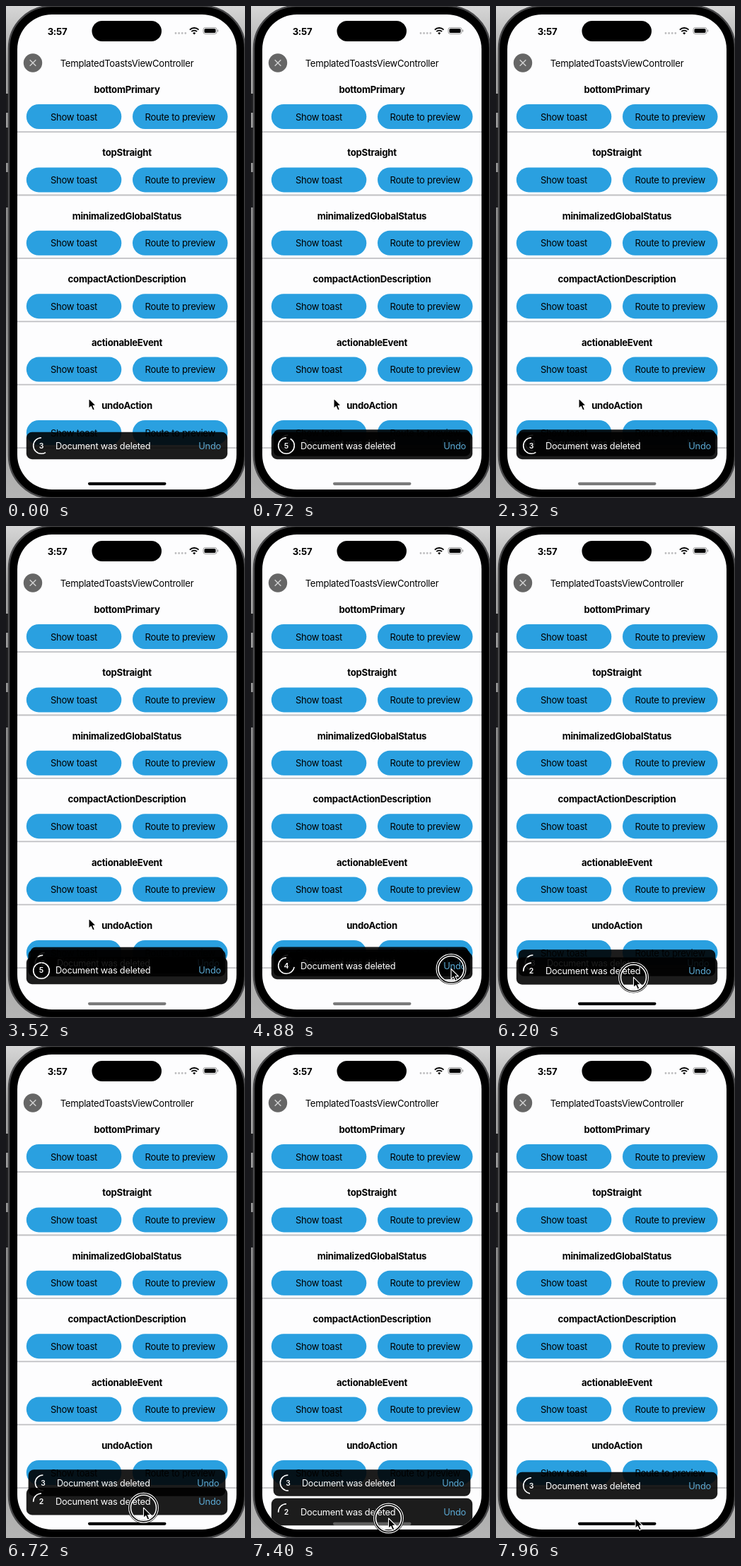
Animation of 338x696 px, one loop 8 s. Source, as an HTML page:

```html
<!DOCTYPE html>
<html lang="en">
<head>
<meta charset="utf-8">
<title>Toast stack</title>
<style>
  html, body { margin: 0; width: 100%; height: 100%; overflow: hidden; }
  svg { display: block; width: 338px; height: 696px; }
  text {
    font: 13.1px Inter, sans-serif;
    letter-spacing: -.02em;
    text-anchor: middle;
    dominant-baseline: central;
  }
  .bold { font-weight: 700; font-size: 13.2px; }
  .message, .undo { font-size: 12.85px; }
  .message { fill: #fff; text-anchor: start; }
  .undo { fill: #5ba9d3; text-anchor: end; }
  .count { fill: #fff; font-weight: 600; font-size: 10.5px; letter-spacing: 0; }
</style>
</head>
<body>
<svg viewBox="0 0 338 696">
  <defs>
    <linearGradient id="backdrop" x2="0" y2="1">
      <stop offset="0" stop-color="#d6d6d6"/>
      <stop offset=".12" stop-color="#a4a4a4"/>
      <stop offset=".5" stop-color="#858585"/>
      <stop offset="1" stop-color="#b4b4b4"/>
    </linearGradient>
    <clipPath id="screen"><rect x="16" y="12" width="310" height="672" rx="49"/></clipPath>
  </defs>

  <rect width="338" height="696" fill="url(#backdrop)"/>
  <path d="M1.5 124V151M1.5 172V222M1.5 235V285" stroke="#1c1c1e" stroke-width="3"/>
  <rect x="4" y="0" width="334" height="696" rx="60" fill="#000" stroke="#48484a" stroke-width="2.5"/>

  <g clip-path="url(#screen)">
    <rect x="16" y="12" width="310" height="672" fill="#fdfdfe"/>
    <text x="72.5" y="35.5" class="bold">3:57</text>
    <rect x="121.5" y="21" width="98.5" height="29" rx="14.5"/>
    <path d="M240 38.5H255" stroke="#bdbdbf" stroke-width="2.8" stroke-linecap="round" stroke-dasharray="0 4.6"/>
    <path d="M259.9 33.6A9 9 0 0 1 272.5 33.6M262.3 36.2A5.5 5.5 0 0 1 270.1 36.2" fill="none" stroke="#000" stroke-width="1.9"/>
    <path d="M264.2 38.2A3 3 0 0 1 268.2 38.2L266.2 40.4Z"/>
    <rect x="279" y="30.5" width="19" height="9" rx="2.8" fill="none" stroke="#999"/>
    <rect x="280.5" y="32" width="16" height="6" rx="1.6"/>
    <path d="M299.6 33.5V36.5" stroke="#999" stroke-width="1.2"/>

    <circle cx="38" cy="80.5" r="13.2" fill="#666"/>
    <path d="M33.7 76.2L42.3 84.8M42.3 76.2L33.7 84.8" stroke="#d2d2d2" stroke-width="1.4"/>
    <text x="171" y="81">TemplatedToastsViewController</text>

    <g id="rows"></g>
    <g id="toasts"></g>
    <rect id="home" x="116" y="673.7" width="110.5" height="4.2" rx="2.1"/>
  </g>

  <g id="cursor">
    <g id="press" fill="none">
      <circle r="19.7" stroke="#000" stroke-width="4.8"/>
      <circle r="20.9" stroke="#fff" stroke-width="1.1"/>
      <circle r="18" stroke="#fff" stroke-width="1.6"/>
    </g>
    <path d="M0 0V14.4L3.3 11.4L5.8 17L8.4 15.8L6 10.4H10.4Z" stroke="#fff" stroke-width="1.1" stroke-linejoin="round"/>
  </g>
</svg>

<script>
const LOOP = 8000, LIFETIME = 5000;
const SETTLE = 380;            // pause before a countdown reacts to a change in the stack
const HIDDEN = 90, DRAG = 37;  // distances below the resting place
const UNDO = 5080, GRAB = 5880, RELEASE = 7560;

const byId = id => document.getElementById(id);
const linear = p => p;
const smooth = p => p * p * (3 - 2 * p);
const easeOut = p => 1 - (1 - p) ** 3;
const mix = (a, b, p) => a + (b - a) * p;

// Share of a move done at t, from 0 to 1.
const step = (t, start, duration, ease = linear) =>
  ease(Math.min(1, Math.max(0, (t - start) / duration)));

const button = (x, label) => `
  <rect x="${x}" y="139" width="134.5" height="35" rx="17.5" fill="#2aa0e0"/>
  <text x="${x + 67.2}" y="156.5">${label}</text>`;

byId("rows").innerHTML = [
  "bottomPrimary", "topStraight", "minimalizedGlobalStatus",
  "compactActionDescription", "actionableEvent", "undoAction"
].map((name, i) => `<g transform="translate(0 ${89.4 * i})">
  <text x="171" y="118" class="bold">${name}</text>
  ${button(28.8, "Show toast")}${button(179, "Route to preview")}
  <path d="M16 178.1H326" stroke="#c0c0c3" stroke-width="1.8"/></g>`).join("");

// Oldest first; a countdown runs only during its listed spans.
const FIRST = 20, SECOND = 3200;
const toasts = [
  { enter: -2000, leave: Infinity, runs: [[-2050, FIRST + SETTLE], [RELEASE + 200, LOOP]] },
  { enter: FIRST, leave: RELEASE, runs: [[FIRST + 280, SECOND + SETTLE], [UNDO + SETTLE, GRAB]] },
  { enter: SECOND, leave: UNDO, runs: [[SECOND + 300, UNDO]] }
];

byId("toasts").innerHTML = toasts.map(() => `<g>
  <rect x="-142.2" y="-19.2" width="284.4" height="38.4" rx="8" fill-opacity=".89"/>
  <path d="M0 -11.3A11.3 11.3 0 0 0 0 11.3A11.3 11.3 0 0 0 0 -11.3" transform="translate(-121 0)"
    pathLength="1" fill="none" stroke="#fff" stroke-width="1.6"/>
  <text x="-121" y="0" class="count"></text>
  <text x="-101" y="0" class="message">Document was deleted</text>
  <text x="133" y="0" class="undo">Undo</text></g>`).join("");

const presence = ({ enter, leave }, t) =>
  step(t, enter, 560, easeOut) - step(t, leave, 340, smooth);

const remaining = ({ runs }, t) =>
  runs.reduce((left, [from, to]) => left - (to - from) * step(t, from, to - from), LIFETIME) / LIFETIME;

function drawToast(toast, i, t, drag) {
  const node = byId("toasts").children[i];
  const shown = presence(toast, t), left = remaining(toast, t);
  const depth = toasts.slice(i + 1).reduce((sum, newer) => sum + presence(newer, t), 0);
  const y = 622 - 4 * depth + HIDDEN * (1 - shown) + (toast.leave === RELEASE ? drag : 0);
  node.setAttribute("visibility", shown > 0 ? "visible" : "hidden");
  node.setAttribute("transform", `translate(171 ${y}) scale(${1 - .02 * depth})`);
  node.querySelector("path").setAttribute("stroke-dasharray", `${left} 2`);
  node.querySelector(".count").textContent = Math.ceil(left * 5);
}

function render(t) {
  const drag = DRAG * step(t, GRAB + 60, 1300);
  toasts.forEach((toast, i) => drawToast(toast, i, t, drag));

  // The home indicator lightens after a toast has passed beneath it.
  const gray = 122 * (step(t, FIRST + 230, 300) - step(t, GRAB + 70, 200))
    + 95 * (step(t, 6950, 300) - step(t, RELEASE + 140, 200));
  byId("home").setAttribute("fill", `rgb(${gray} ${gray} ${gray})`);

  const toUndo = step(t, 4280, 440, smooth), toStack = step(t, 5300, 500, smooth);
  const x = mix(mix(117, 283, toUndo), 194.5, toStack) + 2.5 * step(t, RELEASE, 200);
  const y = mix(mix(555, 626.5, toUndo), 631, toStack) + drag;
  byId("cursor").setAttribute("transform", `translate(${x} ${y})`);
  const pressed = t >= 4800 && t < UNDO || t >= GRAB && t < RELEASE;
  byId("press").setAttribute("visibility", pressed ? "visible" : "hidden");
}

const start = performance.now();
function tick() {
  render((performance.now() - start) % LOOP);
  requestAnimationFrame(tick);
}
tick();
</script>
</body>
</html>
```
